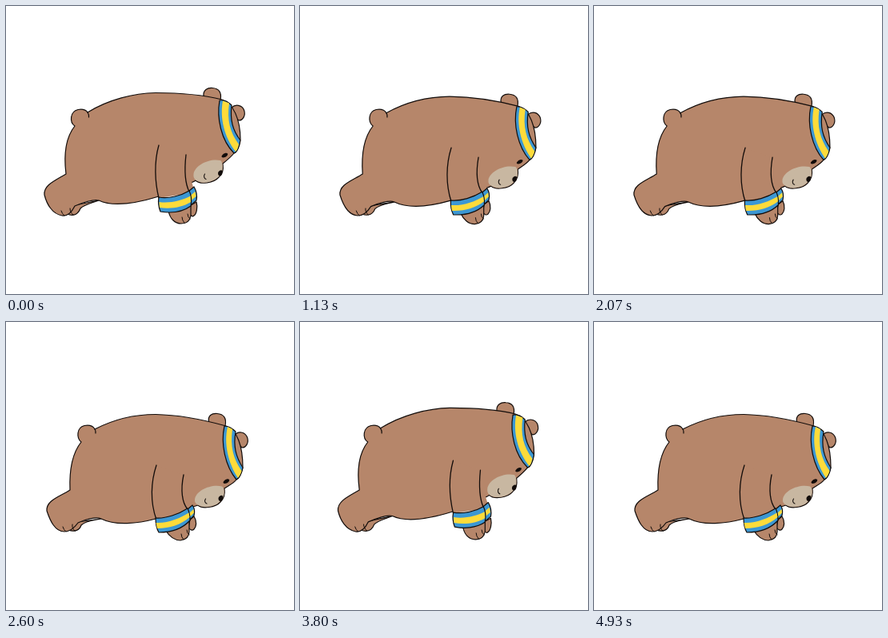
Recreate the animation shown at these times as an HTML page. Size 360 px wide and 360 px high, loop 5 s.

```html
<!DOCTYPE html>
<html lang="en">
<head>
<meta charset="utf-8">
<title>Bear push-ups</title>
<style>
html, body { margin: 0; width: 100%; height: 100%; overflow: hidden; background: #fff; }
svg { display: block; width: 100vw; height: 100vh; }
path { stroke-linecap: round; stroke-linejoin: round; }
</style>
</head>
<body>
<svg id="stage" viewBox="0 0 360 360"></svg>
<script>
const FUR = '#b6866a', TAN = '#c8b7a1', BLUE = '#3c97d3', YELLOW = '#fedb3a', INK = '#120c0a';
const LOOP = 5000, FPS = 15, FRAMES = 75, CYCLE = 7, PEAK = 0.84;

// Each part: fill, outline width, path with arms stretched, path with arms bent.
const parts = [
  // ears
  [FUR, 1.2, 'M 247 113 C 246 105 252 102 258 102.5 C 266 103 270 108 268 117 L 260 121 Z',
             'M 253.5 125 C 252 117 257 114 264 114.5 C 272 115 276 120 274 130 L 266 134 Z'],
  [FUR, 1.2, 'M 282 127 C 287 122 295 124 297.500 130 C 300 137 296 143 291 143 L 284 138 Z',
             'M 287 140 C 292 136 299 138 301.500 144 C 304 151 300 157 295 157 L 288 151 Z'],
  // far foot
  [FUR, 1.2, 'M 76 260 C 84 263 90 261 93 253 C 98 248 108 246 116 243 L 86 249 Z',
             'M 78 260 C 86 263 92 260 94 254 C 100 248 110 248 119 246 L 90 250 Z'],
  // body and head
  [FUR, 1.2,
    'M 102 133 C 128 117 160 109 187 108.5 C 215 108.5 246 111 270 117 C 284 121 293 142 293 167 ' +
    'C 291 177 288 183 285 184 C 281 189 276 193 271 197 C 272 205 271 209 266 214 ' +
    'C 260 221 243 224 237 218 C 235 220 231 221 227 222 L 210 230 L 191 238 ' +
    'C 165 246 135 252 116 243 C 110 241 95 246 86 250 C 82 258 77 263 70 262 ' +
    'C 58 260 51 248 48 236 C 47 224 60 219 75 210 C 72 185 74 165 86 150 ' +
    'C 79 145 80 132 90 129.5 C 96 128.5 100 130 102 133 Z',
    'M 111 134 C 134 122 160 115.5 187 115.5 C 215 116 250 123 275 130 C 289 135 296 155 296 182 ' +
    'C 294 190 291 196 288 197 C 284 202 279 204 273 208 C 274 215 273 220 268 225 ' +
    'C 262 232 245 234 240 229 C 237 230 234 231 230 232 L 210 240 L 187 246 ' +
    'C 165 252 137 255 119 246 C 113 243 98 247 90 251 C 85 258 80 262 73 262 ' +
    'C 61 262 55 248 51 236 C 50 223 66 219 80 210 C 79 185 82 165 94 150 ' +
    'C 88 145 88 132 98 129.5 C 104 128.5 109 130 111 134 Z'],
  ['none', 1.2, 'M 102 133 Q 104 136 103.5 139', 'M 111 134 Q 112.500 136 112 139'],
  // toes
  ['none', 1, 'M 69 256 Q 70 260 73 262 M 80 253 Q 80 258 84 261',
              'M 71 256 Q 72 260 75 262 M 83 253 Q 82 258 86 261'],
  // face
  [TAN, 0, 'M 234.500 210 C 236 199 254 190 268 193 C 270.500 195 271 199 270.500 204 C 270 210 266 214 261 217 C 253 221.500 243 222 237 217.500 C 235 216 234 213 234.500 210 Z',
           'M 236 222 C 237 211 256 202 270 205.500 C 272.500 207 273 211 272.500 215 C 272 220 268 224.500 263 228 C 255 232 245 232 239.500 228.500 C 237 227 235.500 225 236 222 Z'],
  ['none', 1.1, 'M 248.500 210 C 246.500 213 248 216 250 216.500', 'M 249.500 221 C 247.500 224 249 226.500 251 227'],
  [INK, 0, 'M 269.500 188.500 C 269.500 185.500 275 182.500 277 184.500 C 278.500 187 271.500 191.500 269.500 188.500 Z',
           'M 271.500 201 C 271.500 198 277 195 279 197 C 280.500 199.500 273.500 204 271.500 201 Z'],
  [INK, 0, 'M 265 209 C 265 206.500 269 204 270.500 206 C 271 209 270 212 267.500 212.500 C 266 212.500 265 211 265 209 Z',
           'M 265.500 220.500 C 265.500 218 269.500 215.500 271 217.500 C 271.500 220.500 270.500 223.500 268 224 C 266.500 224 265.500 222.500 265.500 220.500 Z'],
  // headband
  [BLUE, 1.2, 'M 267 118 C 263 140 269 168 285 184 C 289 183 292 175 293 168 C 283 155 280 142 282 124 C 278 120 272 117 267 118 Z',
              'M 273 130 C 268 152 274 180 288 197 C 292 195 295 188 296 182 C 287 168 284 155 287 137 C 283 133 278 130 273 130 Z'],
  [YELLOW, 0, 'M 271 118.500 C 267 140 273 164 287 182 C 290 179 290 176 291 173 C 280 158 276 143 279 121.500 Z',
              'M 277 131 C 272 152 278 177 290 195 C 293 191 294 188 294.5 186 C 284 171 280 155 283 134 Z'],
  // far arm
  [FUR, 0, 'M 224 212 L 232 219 L 235 230 L 226 235 Z', 'M 221 222 L 234 230 L 233 233 L 223 238 Z'],
  [FUR, 1.2, 'M 231 249 L 238 245 C 240 252 238 260 235 262 C 233 264 230 262 229 258 Z',
             'M 230 247 L 235 243 C 239 249 238 256 235 259 C 233 261 230 260 228 257 Z'],
  [BLUE, 1.2, 'M 229 231 L 235 226 C 238 231 239 238 238 243 L 231 249 Z',
              'M 227 234 L 233 229 C 236 233 236 238 235 242 L 230 247 Z'],
  [YELLOW, 0, 'M 230.500 237 L 236.500 232 L 237.500 238 L 231.500 243 Z',
              'M 229 239 L 234.500 234 L 235 238.500 L 230.500 243 Z'],
  // near arm
  [FUR, 0, 'M 191 174 C 185 195 186 220 191 240 L 230 234 C 224 222 222 208 225 186 Z',
           'M 188 179 C 181 200 180 225 188 247 L 229 238 C 220 228 218 210 222 191 Z'],
  ['none', 1.3, 'M 191 174 C 185 195 186 220 191 240 M 225 186 C 222.500 208 224 222 229 232',
                'M 188 179 C 181 200 180 225 188 247 M 222 191 C 218 210 220 226 227 234'],
  [FUR, 1.2, 'M 203 256 C 205 266 211 272 219 272 C 226 272 230 268 231 262 L 231 249 Z',
             'M 200 261 C 204 268 211 273 218 273 C 225 272 229 268 229 262 L 229 248 Z'],
  ['none', 1, 'M 220 264 Q 220 268 223 271 M 227 260 Q 227 264 230 266',
              'M 219 265 Q 219 269 222 272 M 226 260 Q 226 264 229 266'],
  [BLUE, 1.2, 'M 191 239 C 204 241 219 237 229 231 C 232 237 232 244 231 250 C 220 258 205 259 193 257 C 191 252 190 245 191 239 Z',
              'M 187 245 C 200 246 216 240 227 233 C 229 237 230 243 230 248 C 220 259 206 263 191 263 C 188 258 187 251 187 245 Z'],
  [YELLOW, 0, 'M 191.500 245 C 205 247 220 243 230.500 237.500 L 231 245 C 220 252 205 254 192 252 Z',
              'M 187.500 251 C 202 252 218 245 228.500 238.500 L 229.500 244 C 219 253 205 258 189 258 Z']
];

const stage = document.getElementById('stage');
const shapes = parts.map(([fill, width, up, down]) => {
  const node = document.createElementNS('http://www.w3.org/2000/svg', 'path');
  node.setAttribute('fill', fill);
  if (width) {
    node.setAttribute('stroke', INK);
    node.setAttribute('stroke-width', width);
  }
  stage.append(node);
  return { node, up, down: down.match(/[\d.]+/g).map(Number) };
});

function blend(up, down, amount) {
  let i = 0;
  return up.replace(/[\d.]+/g, n => (+n + (down[i++] - n) * amount).toFixed(2));
}

// The lowest drawn step of the cosine counts as fully bent, the first as stretched.
const swing = step => Math.cos((step - PEAK) / CYCLE * 2 * Math.PI);
const bend = step => (swing(0) - swing(step)) / (swing(0) - swing(4));

function draw(now) {
  const frame = Math.min(FRAMES - 1, Math.floor((now % LOOP + 4) * FPS / 1000));
  const amount = bend(frame % CYCLE);
  for (const { node, up, down } of shapes) node.setAttribute('d', blend(up, down, amount));
}

let start;
function tick(now) {
  start ??= now;
  draw(now - start);
  requestAnimationFrame(tick);
}
draw(0);
requestAnimationFrame(tick);
</script>
</body>
</html>
```
